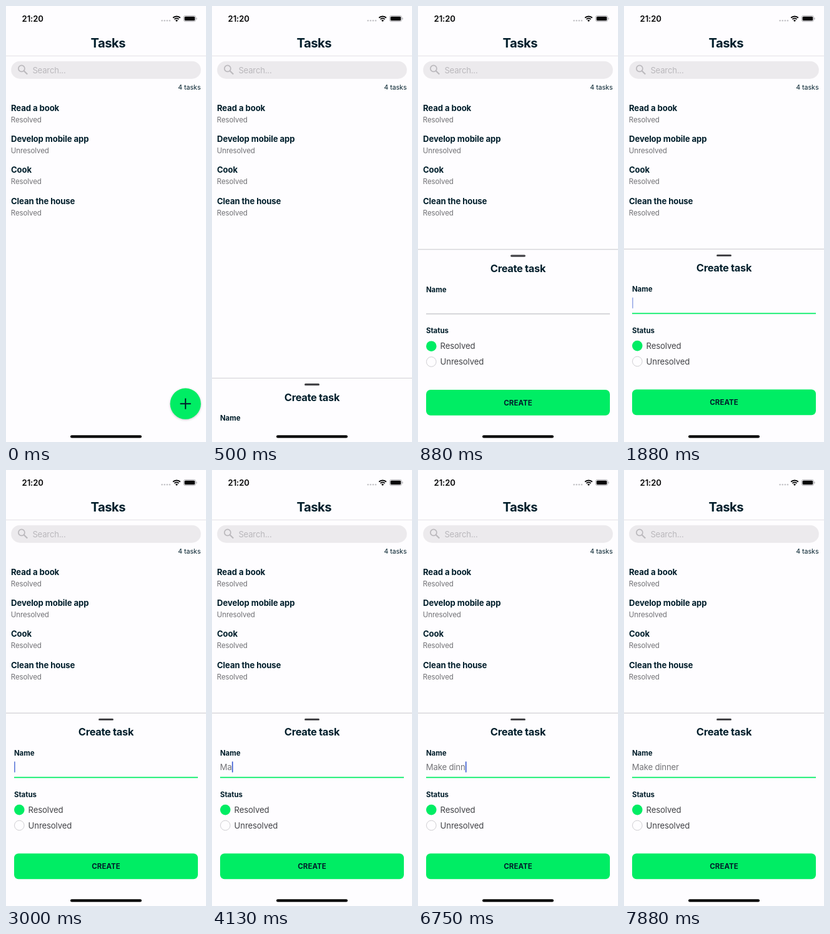
These frames come from a looping animation (320 by 693 pixels, 8000 ms). An HTML page with a canvas:

```html
<!DOCTYPE html>
<html lang="en">
<head>
<meta charset="utf-8">
<title>Tasks</title>
<style>
  html, body { margin: 0; width: 100%; height: 100%; overflow: hidden; background: #fefdff; }
  canvas { display: block; width: 320px; height: 693px; }
</style>
</head>
<body>
<canvas id="stage"></canvas>
<script>
const W = 320, H = 693, LOOP = 8000, TICK = 125;
const BG = '#fefdff', NAVY = '#001e2b', GREEN = '#00ed64', GREY = '#717175', RULE = '#d0d0d4';
const canvas = document.getElementById('stage');
const ctx = canvas.getContext('2d');
const dpr = window.devicePixelRatio || 1;
canvas.width = W * dpr;
canvas.height = H * dpr;

const tasks = [
  ['Read a book', 'Resolved'],
  ['Develop mobile app', 'Unresolved'],
  ['Cook', 'Resolved'],
  ['Clean the house', 'Resolved']
];

// Ticks at which each key of the task name is pressed
const NAME = 'Make dinner';
const keys = [31, 33, 35, 36, 37, 50, 51, 53, 54, 55, 56];

// Caret opacity from a tick onwards
const blink = [
  [0, 0], [15, .5], [16, 1], [20, .5], [21, 0], [23, .4], [24, .8], [25, 1],
  [28, .5], [29, 0], [31, 1], [42, 0], [44, .5], [45, 1], [49, .5], [50, 1],
  [61, .6], [62, .2], [63, 0]
];

const OPEN_TICK = 4, FOCUS_TICK = 15;

function setFont(size, weight, spacing) {
  ctx.font = `${weight} ${size}px Inter, "Liberation Sans", sans-serif`;
  ctx.letterSpacing = spacing + 'px';
}

function text(str, x, y, size, color, { weight = 400, spacing = 0, align = 'left' } = {}) {
  setFont(size, weight, spacing);
  ctx.textAlign = align;
  ctx.fillStyle = color;
  ctx.fillText(str, x, y);
}

function box(x, y, w, h, r, color) {
  ctx.fillStyle = color;
  ctx.beginPath();
  ctx.roundRect(x, y, w, h, r);
  ctx.fill();
}

function disc(x, y, r, color) {
  ctx.fillStyle = color;
  ctx.beginPath();
  ctx.arc(x, y, r, 0, 2 * Math.PI);
  ctx.fill();
}

function ring(x, y, r, width, color, from = 0, to = 2 * Math.PI) {
  ctx.strokeStyle = color;
  ctx.lineWidth = width;
  ctx.beginPath();
  ctx.arc(x, y, r, from, to);
  ctx.stroke();
}

function line(x1, y1, x2, y2, width, color) {
  ctx.strokeStyle = color;
  ctx.lineWidth = width;
  ctx.beginPath();
  ctx.moveTo(x1, y1);
  ctx.lineTo(x2, y2);
  ctx.stroke();
}

function drawStatusBar() {
  text('21:20', 25.6, 24.8, 13.1, '#050506', { weight: 600, spacing: -.1 });
  for (let i = 0; i < 4; i++) disc(249.6 + i * 4.1, 23.3, 1.25, '#c3c2c6');

  const a = Math.PI * 1.25, b = Math.PI * 1.75;
  ring(273, 24.6, 8.2, 2, '#050506', a, b);
  ring(273, 24.6, 5, 1.9, '#050506', a, b);
  ctx.fillStyle = '#050506';
  ctx.beginPath();
  ctx.moveTo(273, 25);
  ctx.arc(273, 25, 2.9, a, b);
  ctx.fill();

  ctx.strokeStyle = '#a9a9ad';
  ctx.lineWidth = .9;
  ctx.beginPath();
  ctx.roundRect(284.3, 15.4, 19.2, 9.2, 2.7);
  ctx.stroke();
  box(285.6, 16.7, 16.6, 6.6, 1.6, '#050506');
  box(304.4, 18.4, 1.1, 3.2, .6, '#a9a9ad');
}

function drawList() {
  text('Tasks', W / 2 + 3.3, 66.2, 20.2, NAVY, { weight: 700, spacing: -.5, align: 'center' });
  line(0, 79.3, W, 79.3, 1, '#e3e2e5');

  box(8.2, 87.7, 303.6, 28, 14, '#eceaed');
  ring(24.9, 99.4, 5, 1.7, '#bbb9bd');
  line(28.5, 103, 34.2, 108.6, 2.1, '#bbb9bd');
  text('Search...', 42.4, 106.6, 13.13, '#bab8bc', { spacing: -.2 });
  text('4 tasks', 311.5, 132.8, 10.66, NAVY, { spacing: -.02, align: 'right' });

  tasks.forEach(([name, status], i) => {
    const y = i * 49.26;
    text(name, 8, 166.9 + y, 13.13, NAVY, { weight: 700, spacing: -.09 });
    text(status, 7.8, 184.9 + y, 11.5, GREY, { spacing: -.1 });
  });
}

function drawAddButton() {
  ctx.save();
  ctx.shadowColor = 'rgba(0, 0, 0, .22)';
  ctx.shadowBlur = 3.5 * dpr;
  ctx.shadowOffsetY = 1.1 * dpr;
  disc(287.2, 632.2, 24.6, GREEN);
  ctx.restore();
  line(278.6, 632.2, 295.8, 632.2, 2, NAVY);
  line(287.2, 623.6, 287.2, 640.8, 2, NAVY);
}

function drawNameField(tick) {
  const typed = NAME.slice(0, keys.filter(k => k <= tick).length);
  text(typed, 12.7, 476.9, 13.13, '#737377', { spacing: -.15 });
  const end = 13 + ctx.measureText(typed).width;
  line(13, 488.7, 307, 488.7, 1.7, tick >= FOCUS_TICK ? GREEN : RULE);

  ctx.globalAlpha = blink.findLast(([from]) => from <= tick)[1];
  box(end, 463.2, 1.7, 17.6, .8, '#3f5fd2');
  ctx.globalAlpha = 1;
}

function drawSheet(tick) {
  if (tick < OPEN_TICK) return;
  const settle = 205 / 8 ** (tick - OPEN_TICK);
  const drop = tick < FOCUS_TICK ? settle + .2 : 0;

  ctx.save();
  ctx.beginPath();
  ctx.rect(0, 0, W, 665);
  ctx.clip();
  ctx.translate(0, drop);

  box(0, 386, W, 290, 0, BG);
  line(0, 386.3, W, 386.3, 1.2, '#d2d1d5');
  box(148, 394.9, 24, 3.2, 1.6, '#434347');
  text('Create task', W / 2, 422.4, 16.4, NAVY, { weight: 700, spacing: -.3, align: 'center' });

  text('Name', 12.9, 453.9, 11.5, NAVY, { weight: 700, spacing: -.05 });
  drawNameField(tick);

  text('Status', 12.9, 519.5, 11.5, NAVY, { weight: 700, spacing: -.05 });
  disc(21.3, 540.1, 8.3, GREEN);
  text('Resolved', 35.6, 544.8, 13.13, '#424347', { spacing: -.12 });
  ring(21.3, 564.9, 7.8, 1, '#cfced2');
  text('Unresolved', 35.6, 569.5, 13.13, '#424347', { spacing: -.12 });

  box(13, 609.4, 294, 40.8, 7, GREEN);
  text('CREATE', W / 2, 633.9, 11.5, NAVY, { weight: 700, align: 'center' });
  ctx.restore();
}

function draw(time) {
  const tick = Math.floor((time % LOOP) / TICK);
  ctx.setTransform(dpr, 0, 0, dpr, 0, 0);
  box(0, 0, W, H, 0, BG);
  drawStatusBar();
  drawList();
  drawAddButton();
  drawSheet(tick);
  box(103, 682.3, 114, 4.1, 2, '#000');
}

const start = performance.now();
function frame() {
  draw(performance.now() - start);
  requestAnimationFrame(frame);
}
frame();
</script>
</body>
</html>
```
